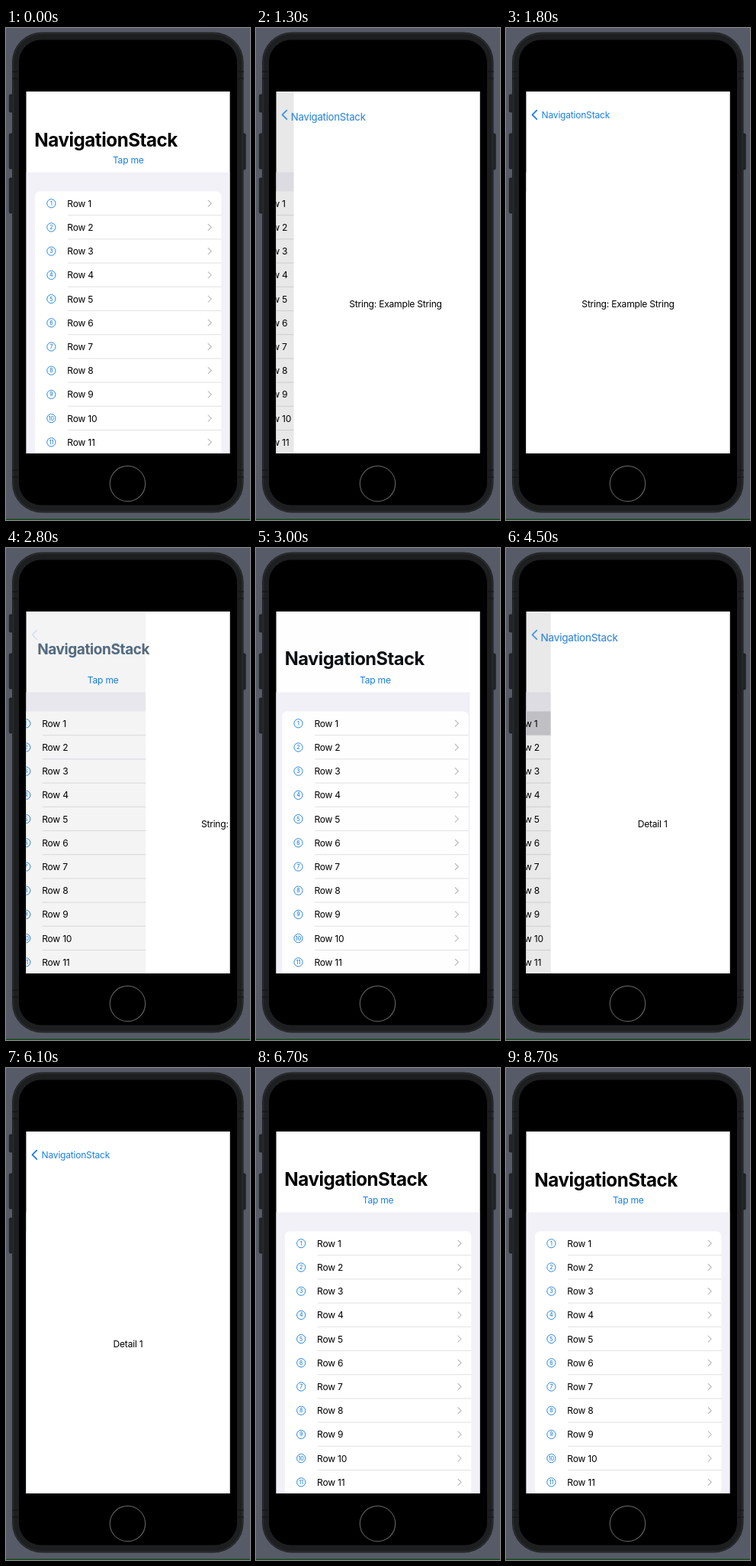
Recreate the animation shown at these times as an HTML page. Size 320 px wide and 643 px high, loop 8800 ms.

```html
<!DOCTYPE html>
<html lang="en">
<head>
<meta charset="utf-8">
<title>Navigation demo</title>
<style>
  html, body { margin: 0; width: 100%; height: 100%; overflow: hidden; background: #565b67; }
  svg { display: block; width: 100vw; height: 100vh; }
  text { font: 12.1px Inter, sans-serif; letter-spacing: -.02em; font-optical-sizing: none; }
  .large { font-size: 24.2px; font-weight: 700; }
  .badge { font-size: 7px; font-weight: 500; letter-spacing: 0; }
  .mid { text-anchor: middle; }
  .blue { fill: #1b80e0; }
  .line { fill: none; stroke-linecap: round; stroke-linejoin: round; }
</style>
</head>
<body>
<svg viewBox="0 0 320 643">
  <defs>
    <clipPath id="screen"><rect x="26.5" y="83" width="267" height="473"/></clipPath>
    <clipPath id="card"><rect x="38" y="213.5" width="244.5" height="400" rx="6.5"/></clipPath>
    <linearGradient id="ring" x2="1" y2="1">
      <stop stop-color="#666"/><stop offset=".5" stop-color="#484848"/><stop offset="1" stop-color="#666"/>
    </linearGradient>
  </defs>

  <!-- Phone -->
  <rect width="320" height="643" fill="#565b67"/>
  <rect y="641.5" width="320" height="1.5" fill="#17491f"/>
  <g fill="#222427" stroke="#17181a" stroke-width=".7">
    <rect x="4.3" y="87" width="6" height="23" rx="1.5"/>
    <rect x="4.3" y="138" width="6" height="46" rx="1.5"/>
    <rect x="4.3" y="196" width="6" height="46" rx="1.5"/>
    <rect x="309" y="138" width="5.2" height="47" rx="1.5"/>
  </g>
  <rect x="8" y="5.5" width="303.5" height="628" rx="39" fill="#1d1e1f"/>
  <rect x="9.5" y="7" width="300.5" height="625" rx="37.5" fill="none" stroke="#2b2c2e" stroke-width="1.5"/>
  <path d="M8 57h8M8 66h8M304 57h8M304 66h8M8 578h8M8 587h8M304 578h8M304 587h8" stroke="#121314"/>
  <rect x="17" y="15.5" width="286" height="608" rx="29" fill="#000"/>
  <circle cx="159.5" cy="595.5" r="23.2" fill="none" stroke="url(#ring)" stroke-width="1.3"/>

  <!-- App -->
  <g clip-path="url(#screen)">
    <rect x="26" y="83" width="268" height="474" fill="#fff"/>
    <g id="list">
      <rect x="26.5" y="188.5" width="267" height="368" fill="#f2f1f8"/>
      <text id="tap" class="mid blue" x="160.3" y="177.3">Tap me</text>
      <g clip-path="url(#card)">
        <rect x="38" y="213" width="245" height="344" fill="#fff"/>
        <rect id="selected" x="38" y="213" width="245" height="31.5" fill="#d1d1d6"/>
        <g id="rows"></g>
      </g>
      <rect id="dim" x="26.5" y="83" width="267" height="473"/>
    </g>
    <g id="detail">
      <rect x="26.5" y="83" width="268" height="473" fill="#fff"/>
      <text id="label" class="mid" x="160" y="365.3"></text>
    </g>
    <g id="heading">
      <text id="title" class="large">NavigationStack</text>
      <text id="back" class="blue">NavigationStack</text>
    </g>
    <path id="chevron" class="line" d="M40.3 107.6l-5.8 5.8 5.8 5.8" stroke="#1b80e0" stroke-width="1.8"/>
  </g>
</svg>
<script>
const LOOP = 8800, WIDTH = 267, ROW = 31.2, BACK_SCALE = .476;
const el = id => document.getElementById(id);
const lerp = (a, b, p) => a + (b - a) * p;

el('rows').innerHTML = Array.from({ length: 11 }, (_, i) => {
  const y = 229.3 + i * ROW;
  return `<circle cx="59.4" cy="${y}" r="5.6" fill="none" stroke="#2a86dc"/>
    <text class="badge mid blue" x="59.4" y="${y + 2.5}">${i + 1}</text>
    <text x="80.3" y="${y + 4.4}">Row ${i + 1}</text>
    <path class="line" d="M265.2 ${y - 4}l4.1 4-4.1 4" stroke="#bfbfc3" stroke-width="1.2"/>
    <path d="M81 ${y + 15.4}H283" stroke="#d9d9dd" stroke-width=".75"/>`;
}).join('');

// Critically damped spring from 0 to 1
function spring(ms) {
  const x = 14 * Math.max(0, ms) / 1000;
  return 1 - (1 + x) * Math.exp(-x);
}

// Dimmed while held, then fading back
function press(t, down, up) {
  if (t < down) return 1;
  return t < up ? .35 : Math.min(1, .35 + (t - up) / 300);
}

function draw(t) {
  const secondVisit = spring(t - 4240) - spring(t - 6120);
  const p = spring(t - 1010) - spring(t - 2660) + secondVisit;
  const scale = lerp(1, BACK_SCALE, p);

  el('list').setAttribute('transform', `translate(${-.3 * WIDTH * p})`);
  el('detail').setAttribute('transform', `translate(${WIDTH * (1 - p)})`);
  el('heading').setAttribute('transform',
    `translate(${lerp(37.3, 46.6, p)} ${lerp(154.5, 117.7, p)}) scale(${scale})`);
  el('back').setAttribute('transform', `scale(${1 / BACK_SCALE})`);

  const backPress = press(t, 2590, 2660);
  el('title').style.opacity = 1 - p;
  el('back').style.opacity = p * backPress;
  el('chevron').style.opacity = p * p * backPress;
  el('dim').style.opacity = .1 * p;
  el('tap').style.opacity = press(t, 890, 1010);
  el('selected').style.opacity = t > 4240 ? 1 - spring(t - 6120) : 0;
  el('label').textContent = t < 3800 ? 'String: Example String' : 'Detail 1';
}

const start = performance.now();
function frame() {
  draw((performance.now() - start) % LOOP);
  requestAnimationFrame(frame);
}
frame();
</script>
</body>
</html>
```
